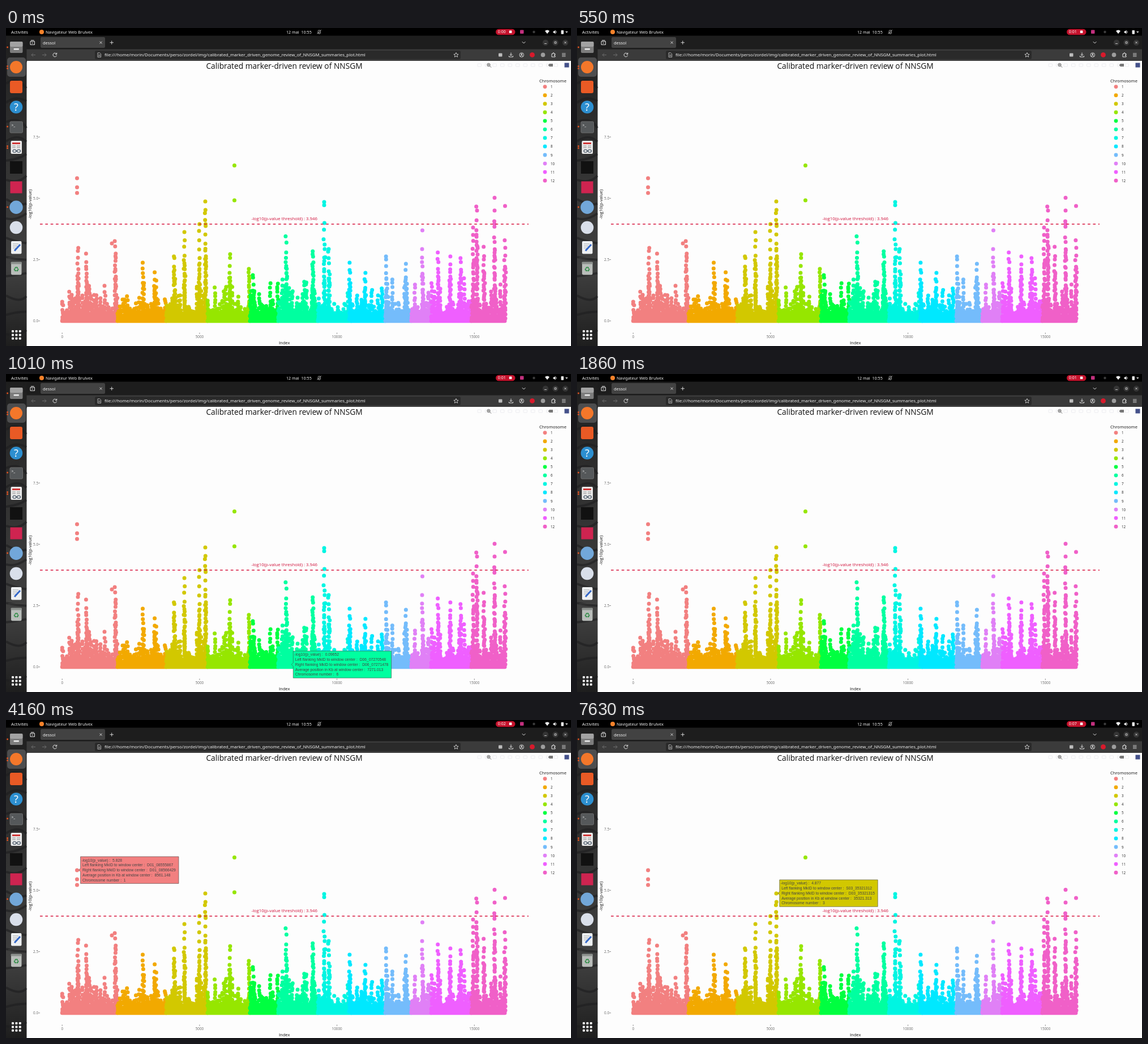
An HTML page that plays this animation: 998x561 px, repeating every 8 s.

```html
<!DOCTYPE html>
<html lang="fr">
<head>
<meta charset="utf-8">
<title>Scan</title>
<style>
html, body { margin: 0; width: 100%; height: 100%; overflow: hidden; background: #fdfdfd; }
svg { display: block; width: 100vw; height: 100vh; }
text { white-space: pre; }
.ui { font-family: "Noto Sans", sans-serif; }
.plot { font-family: "Open Sans", sans-serif; }
.tip { font: 6.76px "Liberation Sans", Arial, sans-serif; }
</style>
</head>
<body>
<svg id="stage" viewBox="0 0 998 561" preserveAspectRatio="none"></svg>
<script>
const LOOP = 8000;
const stage = document.getElementById("stage");

function add(parent, tag, attrs = {}, content) {
  const node = document.createElementNS("http://www.w3.org/2000/svg", tag);
  for (const key in attrs) node.setAttribute(key, attrs[key]);
  if (content !== undefined) node.textContent = content;
  parent.appendChild(node);
  return node;
}
const group = (cls) => add(stage, "g", { class: cls });
const rect = (g, x, y, width, height, fill, rx = 0, more = {}) =>
  add(g, "rect", { x, y, width, height, fill, rx, ...more });
const disc = (g, cx, cy, r, fill) => add(g, "circle", { cx, cy, r, fill });
const line = (g, d, stroke, width = 1, more = {}) =>
  add(g, "path", { d, stroke, "stroke-width": width, fill: "none", ...more });
const label = (g, x, y, size, fill, str, more = {}) =>
  add(g, "text", { x, y, "font-size": size, fill, ...more }, str);
const middle = { "text-anchor": "middle" };

let seed = 20;
function random() {
  seed = (seed * 16807) % 2147483647;
  return seed / 2147483647;
}

// Plot scale: 5000 positions and one unit of -log10(p) in pixels
const LEFT = 99.2, BASE = 516.8, STEP_X = 242.7, UNIT_Y = 43.28;

// Each chromosome: colour, right edge, main peaks and lone hits as [x, y]
const chromosomes = [
  { color: "#f28080", end: 197, peaks: [[127, 388], [142, 398], [193, 376]],
    hits: [[125.5, 265], [125.5, 281], [125.5, 291], [187, 380]] },
  { color: "#f2a900", end: 283, peaks: [[242, 414], [262, 431]] },
  { color: "#d2c800", end: 356, peaks: [[297, 403], [315, 360], [341, 346], [352, 321]], hits: [[352, 306]] },
  { color: "#96e600", end: 431, peaks: [[395, 399], [429, 425]], hits: [[403.5, 242.5], [403.5, 304]] },
  { color: "#00ff40", end: 481, peaks: [[437, 436]] },
  { color: "#00ffa0", end: 551, peaks: [[494.5, 367.5], [542, 394]] },
  { color: "#00f5e2", end: 610, peaks: [[562, 344], [570, 390]], hits: [[562, 307], [562, 312.5]] },
  { color: "#00e8ff", end: 670, peaks: [[607, 414], [634, 432]] },
  { color: "#74bcfb", end: 716, peaks: [[671.5, 403], [706.5, 416]] },
  { color: "#e080f6", end: 751, peaks: [[735.5, 390]], hits: [[735.5, 357]] },
  { color: "#ef5fff", end: 822, peaks: [[763, 396], [784, 403], [803, 406]] },
  { color: "#f060c8", end: 881, peaks: [[825, 352], [831.5, 315], [844, 386], [863, 322], [881, 374.5]],
    hits: [[863, 299.5], [881.5, 314]] },
];

function drawDots(g) {
  let from = LEFT;
  for (const { color, end, peaks, hits = [] } of chromosomes) {
    let d = `M${from} ${BASE}H${end}`;
    const dot = (x, y) => { d += `M${x.toFixed(1)} ${y.toFixed(1)}h0`; };
    // Hits thin out with height
    const stack = (x, top) => {
      for (let y = top; y < 514; y += 2.5 + random() * (4 + (BASE - y) * 0.08))
        dot(x + random() * 2 - 1, y);
    };
    for (let x = from; x < end; x += 0.6)
      dot(x, BASE - Math.min(30, -Math.log(random()) * 7));
    for (let x = from + 1; x < end; x += 2.5 + random() * 2.5)
      stack(x, 503 - 62 * random() ** 2);
    for (const [x, top] of peaks) {
      stack(x, top);
      stack(x + 1, top + (BASE - top) * 0.35);
    }
    for (const [x, y] of hits) dot(x, y);
    line(g, d, color, 7, { "stroke-linecap": "round" });
    from = end;
  }
}

function drawPlot() {
  const g = group("plot");
  rect(g, 36, 58, 962, 503, "#fdfdfd");
  label(g, 491.5, 71.5, 13.76, "#111", "Calibrated marker-driven review of NNSGM", middle);
  drawDots(g);

  for (let i = 0; i < 4; i++) {
    const y = BASE - i * 2.5 * UNIT_Y, x = LEFT + i * STEP_X;
    label(g, 57, y + 2.4, 6.3, "#666", (i * 2.5).toFixed(1), { "text-anchor": "end" });
    line(g, `M57.5 ${y}h2.5`, "#555", 0.7);
    label(g, x, 547, 6.3, "#666", i * 5000, middle);
    line(g, `M${x} 537.5v2.3`, "#555", 0.7);
  }
  label(g, 491.7, 557.5, 7.6, "#111", "Index", middle);
  label(g, 0, 0, 7.6, "#111", "-log10(p-value)", { ...middle, transform: "translate(45 311) rotate(-90)" });
  line(g, "M60 346H923", "#d8173f", 1.4, { "stroke-dasharray": 4.678 });
  label(g, 491.7, 339, 7.8, "#d0103a", "-log10(p-value threshold) : 3.946", middle);

  label(g, 942, 96, 7.55, "#111", "Chromosome");
  chromosomes.forEach(({ color }, i) => {
    const y = 103.6 + i * 15.05;
    disc(g, 952, y, 3.4, color);
    label(g, 962, y + 2.5, 6.2, "#222", i + 1);
  });

  // Chart toolbar
  for (let x = 833; x < 980; x += 13.5)
    rect(g, x, 63, 6.5, 5, "none", 1, { stroke: "#ececf0" });
  add(g, "circle", { cx: 852.5, cy: 65, r: 2.6, stroke: "#555", fill: "#fdfdfd" });
  line(g, "M854.5 67l2.6 2.6M851.2 65h2.6M852.5 63.7v2.6", "#555", 0.9);
  add(g, "path", { d: "M957.5 65.5l2.5-2.5h6v5h-6z", fill: "#777" });
  rect(g, 986.5, 61.5, 8, 8, "#44518a");
}

function drawBrowser() {
  const g = group("ui");
  const ink = "#e4e4e4";
  rect(g, 36, 13, 962, 25, "#1d1d1d");
  rect(g, 36, 37.5, 962, 20.5, "#3b3b3b");
  rect(g, 61, 16, 114, 19, "#424242", 2.5);
  label(g, 65, 28.5, 7.4, "#f4f4f4", "dessol");
  line(g, "M165.5 23.7l4 4m0-4l-4 4M183.5 25.7h6.4m-3.2-3.2v6.4", ink, 0.9);
  line(g, "M43 23.5h7.5v6h-7.5zM44 21.8h5.5M45.3 26.5h3", ink);
  line(g, "M911.8 24.2l2.8 2.8 2.8-2.8", ink);
  for (let i = 0; i < 3; i++) disc(g, 953 + i * 17.5, 25.7, 5.2, "#353535");
  line(g, "M951 27.5h4M969 24.2h3v3h-3zM986.3 24l3.4 3.4m0-3.4l-3.4 3.4", ink, 0.8);

  line(g, "M52 47.5h-7m3-3l-3 3 3 3M64 47.5h7m-3-3l3 3-3 3", "#6c6c6c");
  line(g, "M89 45.6a3.3 3.3 0 1 0 .5 2.7M89.7 43.7v2.6h-2.6", ink);
  rect(g, 157, 40, 646, 15, "#2a2a2a", 2.5);
  line(g, "M162 43.8h3.6l2 2v5.6h-5.6zM163.3 47.5h3M163.3 49.3h3", "#cfcfcf", 0.8);
  label(g, 174, 50.2, 7.8, "#eee",
    "file:///home/morin/Documents/perso/zordel/img/calibrated_marker_driven_genome_review_of_NNSGM_summaries_plot.html");
  line(g, "M795 43.4l1.2 2.7 2.9.3-2.2 1.9.7 2.9-2.6-1.6-2.6 1.6.7-2.9-2.2-1.9 2.9-.3z", ink, 0.8);
  rect(g, 870, 44.5, 6.5, 6, "#bdbdbd", 1);
  line(g, "M892 43.5v5m-2.2-2l2.2 2.2 2.2-2.2M888.5 49v2h7v-2", ink);
  line(g, "M914.6 47.5a3.8 3.8 0 1 0-7.6 0a3.8 3.8 0 1 0 7.6 0M908.4 50a2.6 2.6 0 0 1 4.8 0", ink, 0.9);
  disc(g, 910.8, 46.3, 1.3, ink);
  disc(g, 929.5, 47.4, 4.4, "#d81a2c");
  disc(g, 948.5, 47.4, 3.8, "#9d9d9d");
  line(g, "M964 45.5h2v-1.6h2v1.6h2v2h-1.5v1.5h1.5v2h-6z", ink);
  line(g, "M982 45h6.5m-6.5 2.5h6.5m-6.5 2.5h6.5", ink, 0.9);
}

function drawTopBar() {
  const g = group("ui");
  const bold = { "font-weight": 500 };
  rect(g, 0, 0, 998, 13.5, "#000");
  label(g, 9, 9.7, 7.7, "#eee", "Activités", bold);
  disc(g, 63, 7, 4, "#f5822a");
  label(g, 70, 9.7, 7.3, "#eee", "Navigateur Web Brulvex", bold);
  label(g, 495, 9.7, 7.2, "#eee", "12 mai  10:55", bold);
  line(g, "M550.5 9h5.5l-.8-1.2v-2a2 2 0 0 0-4 0v2zM552.4 10.4h1.6M549.8 10.6l7-7.5", "#ccc", 0.8);
  rect(g, 865, 1.8, 34.5, 10.4, "#c4122c", 5.2);
  const clock = label(g, 868.8, 9.4, 7, "#fff", "0:00", bold);
  rect(g, 888.8, 4.5, 4.6, 4.6, "#fff", 0.5);
  rect(g, 908, 3.5, 6.5, 6.5, "#c2307e", 1);
  disc(g, 932.5, 7, 2.2, "#3c3c3c");
  add(g, "path", { d: "M952 5.3q4-3.4 8 0l-4 5z", fill: "#eee" });
  add(g, "path", { d: "M966.5 5.7h1.7l2.3-2v6.8l-2.3-2h-1.7z", fill: "#eee" });
  line(g, "M971.7 5.2q1.3 1.8 0 3.7", "#eee", 0.8);
  rect(g, 980.5, 4, 4.5, 6.8, "#eee", 0.7);
  add(g, "path", { d: "M988 6h4.6l-2.3 2.8z", fill: "#ddd" });
  return clock;
}

function drawDock() {
  const g = group("ui");
  const shade = add(g, "linearGradient", { id: "shade", x2: 0, y2: 1 });
  ["#1e1e1e", "#2c2c2c", "#363636", "#404040", "#1e1e1e"].forEach((color, i) =>
    add(shade, "stop", { offset: i / 4, "stop-color": color }));
  rect(g, 0, 13, 36.5, 548, "url(#shade)");
  for (let y = 30; y < 560; y += 34)
    line(g, `M0 ${y}q${10 + random() * 16} ${random() * 30 - 15} 36 ${random() * 24 - 12}`, "#1d1d1e", 4, { opacity: 0.6 });
  rect(g, 2, 52, 33, 34, "#4d4d4e", 5);
  for (const y of [34, 67.5, 71.5, 174, 208.5, 212, 316]) disc(g, 2.6, y, 1.4, "#e95420");

  rect(g, 7, 24, 22.5, 20, "#7d7d7d", 2);
  rect(g, 7, 24, 22.5, 9, "#a2a2a2", 2);
  rect(g, 13.5, 36, 9.5, 2.5, "#eee", 1);
  disc(g, 18, 69, 11, "#f4772a");
  rect(g, 7, 93, 22, 22, "#e95a25", 3);
  disc(g, 18, 139.5, 11.3, "#2d8fd0");
  label(g, 18, 146, 18, "#fff", "?", middle);
  rect(g, 7, 165, 22.5, 20, "#55585a", 2, { stroke: "#777", "stroke-width": 0.8 });
  label(g, 9.5, 173.5, 6.5, "#fff", ">_");
  rect(g, 8.5, 199, 19.5, 23, "#ececec", 2);
  rect(g, 11, 202, 14, 3, "#d03a3a");
  line(g, "M11 208h6M11 211h6M19 208h6M19 211h6", "#888");
  line(g, "M18 217a3 2.4 0 1 0-6 0a3 2.4 0 1 0 6 0h1.5a3 2.4 0 1 0 6 0a3 2.4 0 1 0-6 0", "#4b5968", 1.3);
  rect(g, 7, 235, 22, 22, "#111");
  rect(g, 7.5, 270.5, 21, 21, "#cf2450");
  disc(g, 18, 316.3, 11.7, "#72a7d9");
  disc(g, 18, 352, 11.3, "#d9dfea");
  rect(g, 9, 376, 18.5, 22.5, "#eef0f2", 2);
  line(g, "M12 381h10M12 384.5h8M12 388h6", "#a5a9ad");
  line(g, "M15 393l10-11", "#3568c8", 3);
  line(g, "M4 405.5h28", "#4a4a4a", 0.7);
  rect(g, 9, 413, 18.5, 22.5, "#b9bdba", 2.5);
  rect(g, 8.5, 412.5, 19.5, 4, "#8c908d", 1.5);
  label(g, 18.2, 430, 12, "#2c8b43", "♻", { ...middle, "font-family": "DejaVu Sans, sans-serif" });
  for (let i = 0; i < 9; i++)
    rect(g, 10 + (i % 3) * 6.4, 533 + Math.floor(i / 3) * 6.4, 4, 4, "#f2f2f2", 1.2);
}

// Hover labels: visible span, anchor point, chromosome, values
const tips = [
  { from: 1010, to: 1460, x: 501.5, y: 512.5, chr: 6, p: "0.09652", left: "D06_07270548", right: "D06_07271478", pos: "7271.013" },
  { from: 2750, to: 6630, x: 125.8, y: 264.7, chr: 1, p: "5.828", left: "D01_08555867", right: "D01_08566429", pos: "8561.148" },
  { from: 6830, to: 7060, x: 352, y: 321, chr: 3, p: "4.524", left: "D03_35321309", right: "D03_35321312", pos: "35321.311" },
  { from: 7060, to: LOOP, x: 352, y: 305.6, chr: 3, p: "4.877", left: "S03_35321312", right: "D03_35321315", pos: "35321.313" },
];

function drawTip(tip) {
  const g = group("tip");
  const x = tip.x + 5.8, top = tip.y - 23.7;
  add(g, "path", {
    d: `M${x - 3.1} ${tip.y}l3.1-3.1V${top}h173.4v47.4H${x}V${tip.y + 3.1}z`,
    fill: chromosomes[tip.chr - 1].color, stroke: "#444", "stroke-width": 0.6,
  });
  [`-log10(p_value) :  ${tip.p}`,
   `Left flanking MkID to window center :  ${tip.left}`,
   `Right flanking MkID to window center :  ${tip.right}`,
   `Average position in Kb at window center :  ${tip.pos}`,
   `Chromosome number :  ${tip.chr}`,
  ].forEach((str, i) => add(g, "text", { x: x + (i ? 3.4 : 2), y: top + 8.5 + i * 8.75, fill: "#444" }, str));
  return g;
}

drawPlot();
drawBrowser();
drawDock();
const clock = drawTopBar();
const tipNodes = tips.map(drawTip);

// Recording clock: start time, seconds shown
const seconds = [[7630, 7], [6630, 6], [2750, 2], [400, 1], [0, 0]];

function update(t) {
  clock.textContent = "0:0" + seconds.find(([start]) => t >= start)[1];
  tips.forEach((tip, i) => {
    tipNodes[i].style.display = t >= tip.from && t < tip.to ? "" : "none";
  });
}

let begin = null;
function tick(now) {
  if (begin === null) begin = now;
  update((now - begin) % LOOP);
  requestAnimationFrame(tick);
}
update(0);
requestAnimationFrame(tick);
</script>
</body>
</html>
```
